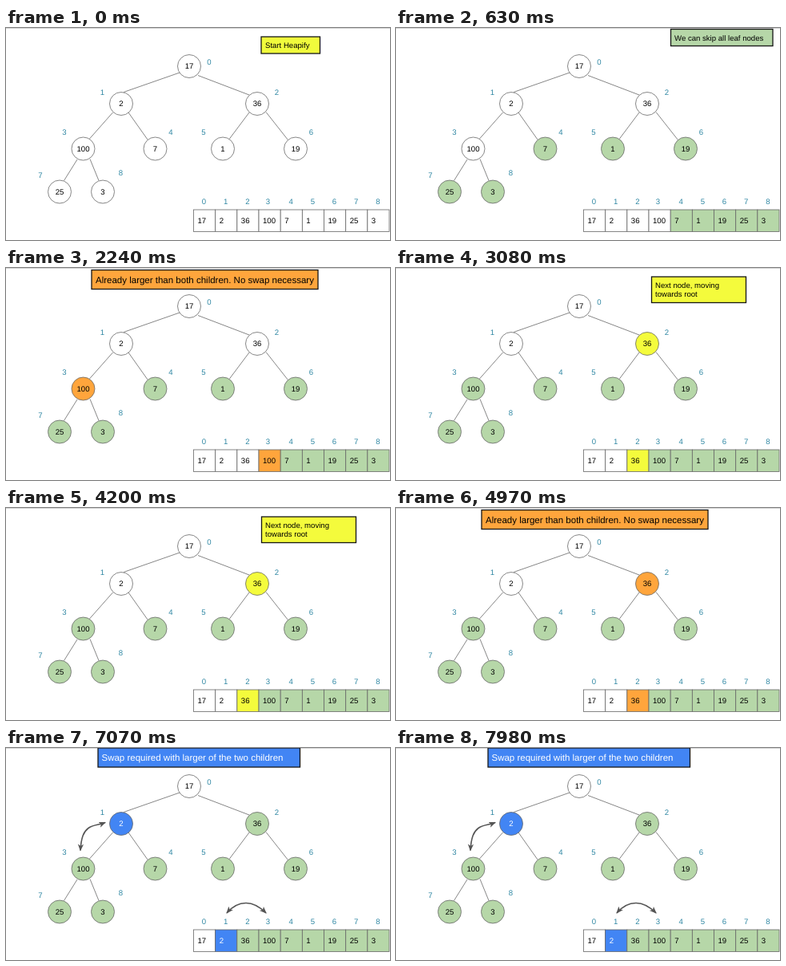
Recreate the animation shown at these times as an HTML page. Size 480 by 266 pixels, loop 8000 ms.

```html
<!DOCTYPE html>
<html lang="en">
<head>
<meta charset="utf-8">
<title>Heapify</title>
<style>
  :root {
    --yellow: #f4fb3c;
    --orange: #ffa53c;
    --green: #b6d7a8;
    --blue: #4285f4;
  }
  html, body { margin: 0; width: 100%; height: 100%; overflow: hidden; background: #fff; }
  svg {
    display: block; width: 480px; height: 266px;
    font: 9.6px "Liberation Sans", Arial, sans-serif;
    text-rendering: geometricPrecision;
  }
  .edge, .shape { stroke: #686868; stroke-width: .8; }
  .shape { fill: #fff; }
  .index { fill: #2f87a3; }
  .mid { text-anchor: middle; }
  .note rect { stroke: #161616; stroke-width: 1.3; }
  .banner { font-size: 11.5px; }
  .arrow { fill: none; stroke: #555; stroke-width: 1.6; }

  .shape, .value, .note { animation: 8s step-end infinite; }
  .note { opacity: 0; }

  .leaf .shape { animation-name: leaf; }
  .n3 .shape { animation-name: third; }
  .n2 .shape { animation-name: second; }
  .n1 .shape { animation-name: first; }
  .n1 .value { animation-name: invert; }

  @keyframes leaf { 0% { fill: #fff } .875% { fill: var(--green) } }
  @keyframes third {
    0% { fill: #fff } 11.375% { fill: var(--yellow) }
    21% { fill: var(--orange) } 36.75% { fill: var(--green) }
  }
  @keyframes second {
    0% { fill: #fff } 36.75% { fill: var(--yellow) }
    53.375% { fill: var(--orange) } 71.75% { fill: var(--green) }
  }
  @keyframes first { 0% { fill: #fff } 71.75% { fill: var(--yellow) } 88.375% { fill: var(--blue) } }
  @keyframes invert { 0% { fill: #000 } 88.375% { fill: #fff } }

  #start { animation-name: start; }
  #skip { animation-name: skip; }
  #formula { animation-name: formula; }
  #larger { animation-name: larger; }
  #next { animation-name: next; }
  #swap { animation-name: swap; }

  @keyframes start { 0% { opacity: 1 } .875% { opacity: 0 } }
  @keyframes skip { 0% { opacity: 0 } .875% { opacity: 1 } 21% { opacity: 0 } }
  @keyframes formula { 0% { opacity: 0 } 11.375% { opacity: 1 } 21% { opacity: 0 } }
  @keyframes larger {
    0% { opacity: 0 } 21% { opacity: 1 } 36.75% { opacity: 0 }
    53.375% { opacity: 1 } 71.75% { opacity: 0 }
  }
  @keyframes next {
    0% { opacity: 0 } 36.75% { opacity: 1 } 53.375% { opacity: 0 }
    71.75% { opacity: 1 } 88.375% { opacity: 0 }
  }
  @keyframes swap { 0% { opacity: 0 } 88.375% { opacity: 1 } }
</style>
</head>
<body>
<svg viewBox="0 0 480 266">
  <defs>
    <marker id="head" viewBox="0 0 8 8" refX="7" refY="4" markerWidth="9" markerHeight="9"
            markerUnits="userSpaceOnUse" orient="auto-start-reverse">
      <path d="M8 4L0 .8L2 4L0 7.2Z" fill="#555"/>
    </marker>
  </defs>
  <path d="M0 .5H480" stroke="#d6d6d6"/>
  <path class="edge" fill="none" d="M217 56L147 80.5M240 59.5L304 84M133.5 106L104 139.5M153 106L177 140
    M304 106L279 139.5M325 105.5L352.500 140.500M89 165L72.500 191.500M105 164.500L116 191.500"/>
  <g id="tree"></g>
  <g id="array"></g>

  <g id="start" class="note">
    <rect x="319" y="11" width="73.5" height="21" fill="#f0fb3c"/>
    <text x="324" y="24.5">Start Heapify</text>
  </g>
  <g id="skip" class="note">
    <rect x="343.5" y="1.5" width="127.5" height="21" fill="#b6d7a8"/>
    <text x="348" y="15.5">We can skip all leaf nodes</text>
  </g>
  <g id="formula" class="note">
    <rect x="335" y="22.5" width="144.5" height="44" fill="#f4fb3c"/>
    <text x="340" y="36.5">Start at first node with children:</text>
    <text x="340" y="59">index = Math.floor( (n-2) / 2) = 3</text>
  </g>
  <g id="larger" class="note banner">
    <rect x="107" y="2.5" width="283" height="24" fill="#ffa53c"/>
    <text x="112" y="18.5">Already larger than both children. No swap necessary</text>
  </g>
  <g id="next" class="note">
    <rect x="319.5" y="11" width="118" height="32.5" fill="#f4fb3c"/>
    <text x="324" y="24.5">Next node, moving</text>
    <text x="324" y="36">towards root</text>
  </g>
  <g id="swap" class="note banner">
    <rect x="115" y="0" width="252.5" height="24" fill="#4285f4"/>
    <text x="119.5" y="16" fill="#fff">Swap required with larger of the two children</text>
    <g class="arrow">
      <path d="M93 128.5C94 112 97 105 103 100.5S115 97 124 93.5" marker-start="url(#head)" marker-end="url(#head)"/>
      <path d="M276 207C282 200 290 194.5 300 194.5S318 200 325 207" marker-start="url(#head)" marker-end="url(#head)"/>
    </g>
  </g>
</svg>
<script>
  // value, node centre, index label centre
  const nodes = [
    [17, 229, 48, 254, 42.5], [2, 144, 95, 120.5, 80.5], [36, 314, 95, 338.5, 80.5],
    [100, 96.5, 151.5, 73, 130.5], [7, 186.5, 151.5, 206, 130.5], [1, 271, 151.5, 247, 130.5],
    [19, 362, 151.5, 381.5, 130.5], [25, 67, 205.5, 43, 184.5], [3, 121, 205.5, 143.5, 181.5]
  ];
  const cell = 27.17, left = 234.5;

  function add(parent, tag, attrs, text = "") {
    const el = document.createElementNS("http://www.w3.org/2000/svg", tag);
    for (const key in attrs) el.setAttribute(key, attrs[key]);
    el.textContent = text;
    return parent.appendChild(el);
  }

  const tree = document.getElementById("tree");
  const array = document.getElementById("array");

  nodes.forEach(([value, cx, cy, lx, ly], i) => {
    const state = i > 3 ? "leaf" : "n" + i;
    const x = left + i * cell;

    const node = add(tree, "g", { class: state });
    add(node, "circle", { class: "shape", cx, cy, r: 14.5 });
    add(node, "text", { class: "value mid", x: cx, y: cy + 3.2 }, value);
    add(node, "text", { class: "index mid", x: lx, y: ly + 3.4 }, i);

    const box = add(array, "g", { class: state });
    add(box, "rect", { class: "shape", x, y: 228, width: cell, height: 27.5 });
    add(box, "text", { class: "value", x: x + 5, y: 245.2 }, value);
    add(box, "text", { class: "index mid", x: x + (i === 3 ? 11.5 : 13), y: 221.3 }, i);
  });
</script>
</body>
</html>
```
